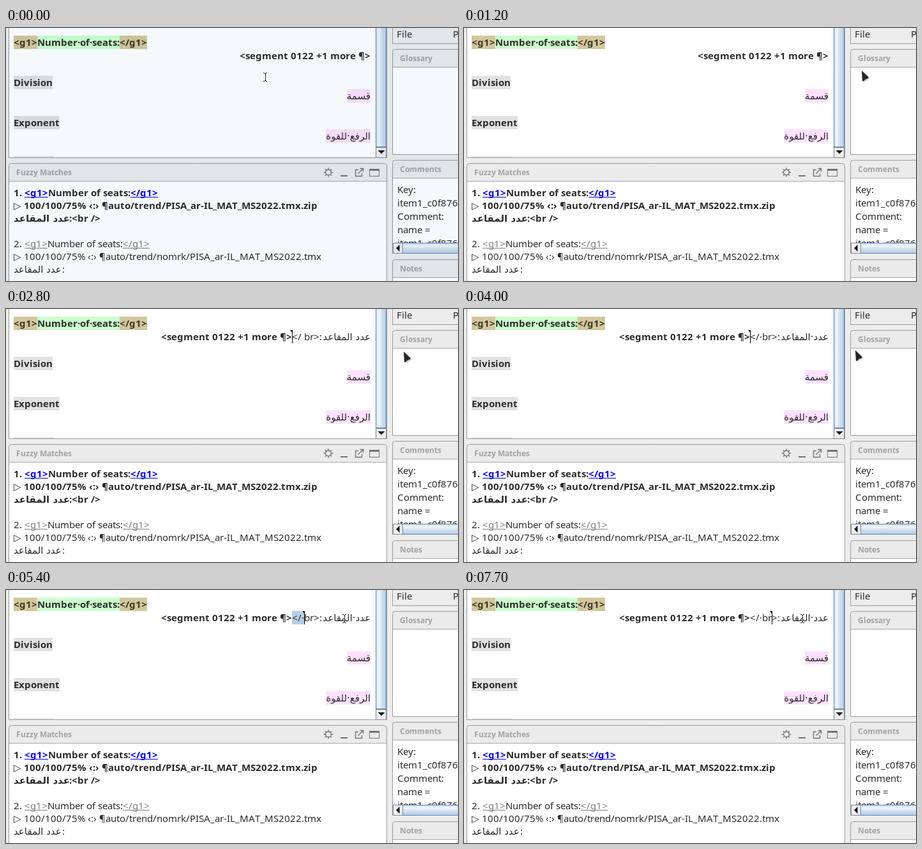
An HTML page with a canvas for the animation above (8000 ms loop, 708 by 397 pixels).

```html
<!DOCTYPE html>
<html lang="en">
<head>
<meta charset="utf-8">
<title>Translation editor</title>
<style>
html, body { margin: 0; width: 100%; height: 100%; overflow: hidden; background: #eee; }
canvas { display: block; width: 708px; height: 397px; }
</style>
</head>
<body>
<canvas id="stage" width="708" height="397"></canvas>
<script>
const ctx = document.getElementById('stage').getContext('2d');
const LOOP = 8000, STEP = 100;
const INK = '#2c2c2c', EDGE = '#999', MUTED = '#a2a2a2', ICON = '#737373';
const REG = '15px "Noto Sans", "DejaVu Sans", sans-serif';
const BOLD = 'bold ' + REG;
const TITLE = 'bold 12px "Noto Sans", sans-serif';
const ARABIC = '15px "DejaVu Sans", sans-serif';
const SEATS = 'عدد المقاعد';

// [time, caret x (0 = hidden), selection end, flag on the right]
const CARET = [
  [0, 0], [700, 459], [1200, 0], [1700, 459], [2200, 0],
  [2800, 448], [3400, 0], [4000, 448], [4400, 0], [4900, 448],
  [5100, 457, 457], [5300, 463, 463], [5400, 467, 467],
  [5600, 476, 476], [5700, 482, 482], [6100, 482, 482, true],
  [6300, 482, 482], [6500, 491, 491], [7000, 0, 491],
  [7500, 491, 491], [7700, 482]
];

const clamp = v => Math.max(0, Math.min(1, v));
const mix = (a, b, k) => a + (b - a) * k;

function box(x, y, w, h, color) {
  ctx.fillStyle = color;
  ctx.fillRect(x, y, w, h);
}

function poly(points, color) {
  ctx.beginPath();
  points.forEach(([x, y]) => ctx.lineTo(x, y));
  ctx.closePath();
  ctx.fillStyle = color;
  ctx.fill();
}

function frame(x, y, w, h, color) {
  ctx.lineWidth = 1;
  ctx.strokeStyle = color;
  ctx.strokeRect(x + 0.5, y + 0.5, w - 1, h - 1);
}

const widths = new Map();
function advance(font, ch) {
  const key = font + ch;
  if (!widths.has(key)) {
    ctx.font = font;
    widths.set(key, Math.round(ctx.measureText(ch).width + 0.02));
  }
  return widths.get(key);
}

// Text on whole-pixel advances; returns the end x.
function text(str, x, y, font = REG, color = INK, mark) {
  const chars = [...str];
  if (mark) {
    const w = chars.reduce((sum, ch) => sum + advance(font, ch), 0);
    box(x, y - 16, w, 21, mark);
  }
  ctx.direction = 'ltr';
  ctx.textAlign = 'left';
  for (const ch of chars) {
    const w = advance(font, ch);
    ctx.font = font;
    ctx.fillStyle = color;
    ctx.fillText(ch, x, y);
    x += w;
  }
  return x;
}

function arabic(str, x, y, align, font = ARABIC) {
  ctx.font = font;
  ctx.fillStyle = INK;
  ctx.direction = 'rtl';
  ctx.textAlign = align;
  ctx.fillText(str, x, y);
}

function link(str, x, y, font, color) {
  const end = text(str, x, y, font, color);
  box(x, y + 1, end - x, 1, color);
  return end;
}

function panel(x, y, w, h, title) {
  ctx.beginPath();
  ctx.roundRect(x + 0.5, y + 0.5, w - 1, h - 1, [4, 4, 0, 0]);
  ctx.fillStyle = '#ebebeb';
  ctx.fill();
  ctx.strokeStyle = EDGE;
  ctx.lineWidth = 1;
  ctx.stroke();
  box(x + 1, y + 28, w - 2, h - 29, '#fff');
  box(x + 1, y + 28, w - 2, 1, '#a8a8a8');
  text(title, x + 12, y + 19, TITLE, MUTED);
}

function thumb(x, y, w, h, vertical) {
  const g = vertical ? ctx.createLinearGradient(x, 0, x + w, 0)
                     : ctx.createLinearGradient(0, y, 0, y + h);
  g.addColorStop(0, '#c8daec');
  g.addColorStop(0.3, '#f2f7fc');
  g.addColorStop(0.55, '#d2e1ef');
  g.addColorStop(1, '#b4cbe2');
  box(x, y, w, h, g);
  frame(x, y, w, h, '#6382bf');
}

function icons() {
  ctx.strokeStyle = ICON;
  ctx.lineWidth = 1.4;
  ctx.beginPath();
  ctx.arc(505, 226.5, 4.3, 0, 7);
  for (let i = 0; i < 8; i++) {
    const c = Math.cos(i * Math.PI / 4), s = Math.sin(i * Math.PI / 4);
    ctx.moveTo(505 + 4.5 * c, 226.5 + 4.5 * s);
    ctx.lineTo(505 + 7.2 * c, 226.5 + 7.2 * s);
  }
  ctx.stroke();
  box(524, 231, 11, 2, ICON);
  ctx.beginPath();
  ctx.moveTo(552, 222.5);
  ctx.lineTo(547.5, 222.5);
  ctx.lineTo(547.5, 232.5);
  ctx.lineTo(557.5, 232.5);
  ctx.lineTo(557.5, 228);
  ctx.moveTo(551.5, 228.5);
  ctx.lineTo(559, 221);
  ctx.moveTo(554.5, 220.5);
  ctx.lineTo(559.5, 220.5);
  ctx.lineTo(559.5, 225.5);
  ctx.stroke();
  frame(569, 221, 16, 12, ICON);
  box(569, 221, 16, 3, ICON);
}

function editor(t, caret, end) {
  box(4, 0, 593, 204, EDGE);
  box(5, 0, 591, 203, '#fff');
  box(579, 0, 17, 203, '#eee');
  thumb(579, -2, 17, 189, true);
  frame(579, 187, 17, 17, '#7a8a99');
  poly([[582.5, 192], [593.5, 192], [588, 197.5]], '#111');

  let x = text('<g1>', 12, 28, BOLD, '#3c3622', '#d3c79d');
  x = text('Number·of·seats:', x, 28, BOLD, INK, '#cfc'.replace('f', 'f'));
  text('</g1>', x, 28, BOLD, '#3c3622', '#d3c79d');

  const pasted = t >= 2700, dots = t >= 2900;
  if (end) box(448, 33, end - 448, 21, '#b8cfe5');
  x = text('<segment 0122 +1 more ¶>', pasted ? 243 : 366, 49, BOLD);
  if (pasted) {
    text(dots ? '</·br>:' : '</ br>:', x, 49);
    arabic(dots ? SEATS.replace(' ', '·') : SEATS, 571, 49, 'right');
  }

  text('Division', 12, 91, BOLD, INK, '#e2e2e2');
  box(534, 96, 37, 21, '#ffe1ff');
  arabic('قسمة', 571, 112, 'right');
  text('Exponent', 12, 154, BOLD, INK, '#e2e2e2');
  box(501, 159, 70, 21, '#ffe1ff');
  arabic('الرفع·للقوة', 571, 175, 'right');
  box(12, 201, 63, 2, '#e2e2e2');

  const [, cx, , flip] = caret;
  if (cx) {
    box(cx, 33, 1, 21, '#000');
    const d = flip ? 5 : -4, base = flip ? cx : cx + 1;
    poly([[base, 33], [base + d, 33], [base, 38]], '#000');
  }
}

function matches() {
  panel(4, 212, 593, 200, 'Fuzzy Matches');
  icons();
  let x = text('1. ', 12, 264, BOLD);
  x = link('<g1>', x, 264, BOLD, '#0000ee');
  x = text('Number of seats:', x, 264, BOLD);
  link('</g1>', x, 264, BOLD, '#0000ee');
  text('▷ 100/100/75% ‹:› ¶auto/trend/PISA_ar-IL_MAT_MS2022.tmx.zip', 12, 284, BOLD);
  arabic(SEATS, 12, 304, 'left', 'bold ' + ARABIC);
  text(':<br />', 99, 304, BOLD);

  x = text('2. ', 12, 344);
  x = link('<g1>', x, 344, REG, '#808080');
  x = text('Number of seats:', x, 344);
  link('</g1>', x, 344, REG, '#808080');
  text('▷ 100/100/75% ‹:› ¶auto/trend/nomrk/PISA_ar-IL_MAT_MS2022.tmx', 12, 364);
  arabic(SEATS, 12, 384, 'left');
  text(':', 88, 384);
}

function sidebar() {
  box(605, 0, 1, 25, EDGE);
  box(605, 24, 103, 1, EDGE);
  text('File', 612, 15);
  text('P', 700, 15);
  panel(605, 33, 120, 166, 'Glossary');
  panel(605, 207, 120, 147, 'Comments');
  ['Key:', 'item1_c0f876', 'Comment:', 'name =', 'item1_c0f876']
    .forEach((line, i) => text(line, 613, 259 + 21 * i));
  box(606, 337, 102, 16, '#eee');
  frame(606, 337, 16, 17, '#7a8a99');
  poly([[616.5, 340], [616.5, 351], [611, 345.5]], '#111');
  thumb(621, 337, 100, 17, false);
  panel(605, 363, 120, 60, 'Notes');
}

function beam(x, y) {
  const parts = [[-3, -7, 2, 1], [1, -7, 2, 1], [-1, -6, 2, 1],
                 [0, -6, 1, 12], [-3, 6, 2, 1], [1, 6, 2, 1], [-1, 5, 2, 1]];
  x = Math.round(x);
  y = Math.round(y);
  parts.forEach(([a, b, w, h]) => box(x + a - 1, y + b - 1, w + 2, h + 2, 'rgba(255,255,255,0.55)'));
  parts.forEach(([a, b, w, h]) => box(x + a, y + b, w, h, '#222'));
}

function arrow(x, y) {
  ctx.save();
  ctx.translate(Math.round(x), Math.round(y));
  ctx.shadowColor = 'rgba(0,0,0,0.35)';
  ctx.shadowBlur = 3;
  ctx.shadowOffsetX = ctx.shadowOffsetY = 1;
  poly([[0, 0], [10.5, 10], [10, 12], [6, 13.2], [2.5, 16.5], [1, 16]], '#232629');
  ctx.restore();
}

function pointer(t) {
  const out = 1 - Math.pow(1 - clamp((t - 50) / 950), 1.5);
  const k = clamp((t - 3900) / 500);
  const back = k * k * (3 - 2 * k);
  const x = mix(mix(406, 623, out), 530, back);
  const y = mix(mix(77, 67, out), 45, back);
  (x < 580 ? beam : arrow)(x, y);
}

function draw(t) {
  const caret = CARET.filter(c => c[0] <= t).pop();
  box(0, 0, 708, 397, '#ededed');
  editor(t, caret, caret[2]);
  matches();
  sidebar();

  const tint = 1 - clamp(t / 900);
  if (tint > 0) {
    ctx.globalCompositeOperation = 'multiply';
    ctx.globalAlpha = tint;
    box(0, 0, 708, 397, '#f5f9fb');
    ctx.globalAlpha = 1;
    ctx.globalCompositeOperation = 'source-over';
  }
  pointer(t);
}

const start = performance.now();
let last = -1;
function tick() {
  const t = Math.floor((performance.now() - start) % LOOP / STEP) * STEP;
  if (t !== last) draw(last = t);
  requestAnimationFrame(tick);
}
tick();
</script>
</body>
</html>
```
